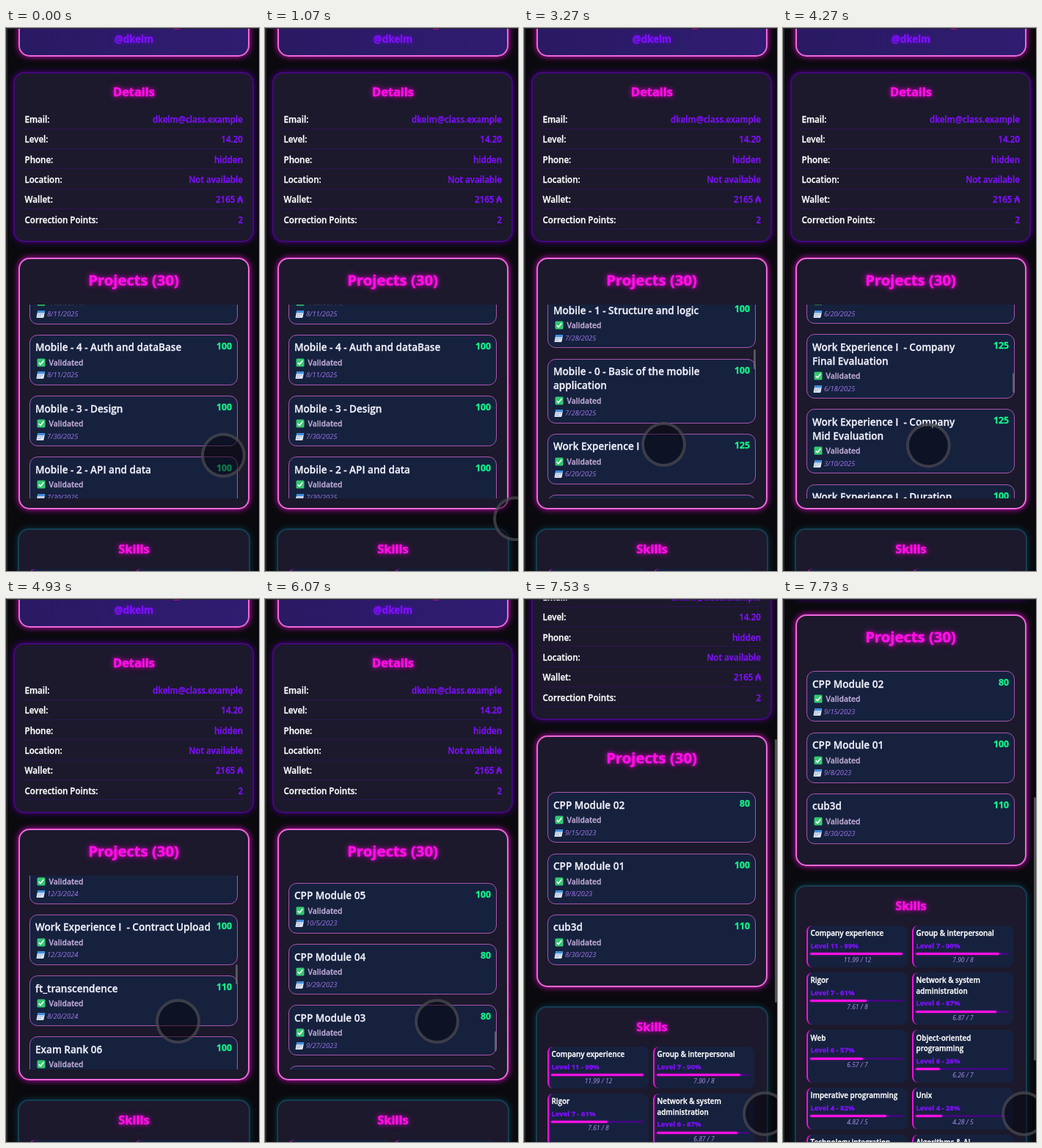
Write an HTML page that moves like this. It is 345 px wide and 740 px high and loops after 8000 ms.

```html
<!DOCTYPE html>
<html lang="en">
<head>
<meta charset="utf-8">
<title>Profile scroll</title>
<style>
  html, body { margin: 0; width: 100%; height: 100%; overflow: hidden; background: #0a0a0e; }
  body { font-family: "Open Sans", "Noto Sans", sans-serif; }
  div, p, svg { position: absolute; box-sizing: border-box; margin: 0; }
  #stage { left: 0; top: 0; width: 345px; height: 740px; overflow: hidden; background: #0a0a0e; }
  #page { left: 0; top: 0; width: 345px; height: 1300px; }
  p { white-space: pre; line-height: 20px; -webkit-text-stroke: .3px currentColor; }
  p.right { text-align: right; width: 200px; }
  p.center { text-align: center; width: 300px; }

  .panel { border-radius: 15px; background: #1c192c; }
  .header { background: linear-gradient(90deg, #291a63, #301c70); }
  .header, .projects { border: 2px solid #ec68d6; box-shadow: 0 0 9px #f010dce0; }
  .details { border: 2px solid #43087a; box-shadow: 0 0 9px #4b0082; }
  .skills { border: 2px solid #143e52; box-shadow: 0 0 8px #0a4f66a0; }

  .handle { font-size: 13.3px; font-weight: 700; color: #8010ff; text-shadow: 0 0 6px #7f00ffb0; }
  .heading { font-size: 16.4px; font-weight: 700; color: #ff10e6; -webkit-text-stroke-width: .5px;
             text-shadow: 0 0 5px #ff00e0b0, 0 0 10px #ff00e0a0; }
  .big { font-size: 20.3px; }
  .label, .value { font-size: 11.6px; font-weight: 600; color: #fff; }
  .value { color: #8010ff; }
  .rule { height: 1px; background: #2b1450; }

  #list { left: 32px; top: 377px; width: 285px; height: 264px; overflow: hidden; }
  #cards { left: 0; top: 0; width: 285px; }
  .card { left: 0; width: 284px; border: 1px solid #a655ab; border-radius: 11px; background: #16213e; }
  .title { font-size: 13.55px; font-weight: 600; color: #f1f1fb; line-height: 19px; }
  .score { font-size: 12.3px; font-weight: 700; color: #14f58a; }
  .status { font-size: 10.35px; font-weight: 600; color: #bfabd6; }
  .date { font-size: 9.3px; font-style: italic; color: #9370db; -webkit-text-stroke-width: .1px; }

  .skill { width: 138px; border-left: 2px solid #f010e0; border-radius: 8px; background: #16213e; }
  .name { font-size: 9.85px; font-weight: 600; color: #fff; line-height: 14.5px; }
  .level { font-size: 9.5px; font-weight: 700; color: #8010ff; }
  .ratio { font-size: 8.5px; font-style: italic; color: #9d86dc; -webkit-text-stroke-width: .1px; }
  .track { width: 127px; height: 3px; border-radius: 2px; background: #40087a; }
  .fill { height: 3px; border-radius: 2px; background: #ff10e6; box-shadow: 0 0 3px #ff00e080; }

  .thumb { width: 3px; border-radius: 2px; background: #7a7a80a0; }
  #pageThumb { left: 342px; height: 359px; }
  #listThumb { left: 281px; }
  #touch { left: -30.5px; top: -30.5px; width: 61px; height: 61px; border-radius: 50%;
           border: 4px solid #5c5c6498; background: #05050a80; filter: blur(.6px); }
  .edge { left: 0; top: 0; background: #2b2b2e; }
</style>
</head>
<body>
<div id="stage">
  <div id="page"></div>
  <div id="pageThumb" class="thumb"></div>
  <div id="touch"></div>
  <div class="edge" style="width:2px;height:740px"></div>
  <div class="edge" style="width:345px;height:1px"></div>
</div>
<script>
const LOOP = 8000;
const PITCH = 83.2, CARD_HEIGHT = 69, LINE = 19;
const VIEW = 264, THUMB = 27;
const START_SCROLL = 292, MAX_SCROLL = 2290;
const HIDDEN_ABOVE = 3;   // projects that never come into view

const $ = id => document.getElementById(id);

// y is the middle of the first text line
function text(x, y, cls, str, align = "", lineHeight = 20) {
  const left = align === "right" ? x - 200 : align === "center" ? x - 150 : x;
  return `<p class="${cls} ${align}" style="left:${left}px;top:${y - lineHeight / 2}px">${str}</p>`;
}
const box = (cls, x, y, w, h, inner = "") =>
  `<div class="${cls}" style="left:${x}px;top:${y}px;width:${w}px;height:${h}px">${inner}</div>`;
const icon = (x, y, inner) =>
  `<svg style="left:${x}px;top:${y}px" width="13" height="12" viewBox="0 0 13 12">${inner}</svg>`;

const CHECK = `<rect x=".5" y=".5" width="11" height="11" rx="1.5" fill="#35c873"/>
  <path d="M2.7 6.2 5 8.6 9.4 3.2" fill="none" stroke="#fff" stroke-width="1.6"/>`;
const CALENDAR = `<g transform="translate(2 0) skewX(-11)">
  <rect x=".5" y="1" width="10" height="10" rx="1" fill="#dfe6f4"/>
  <rect x=".5" y="1" width="10" height="3.2" rx="1" fill="#3f8fdc"/>
  <path d="M2 6.2h7M2 8.6h5" stroke="#8ba0c8" stroke-width="1.2" stroke-dasharray="1.5 1"/></g>`;

const details = [
  ["Email:", "dkelm@class.example"], ["Level:", "14.20"], ["Phone:", "hidden"],
  ["Location:", "Not available"], ["Wallet:", "2165 ₳"], ["Correction Points:", "2"]
];

const projects = [
  ["Mobile - 5 - Manage data", "8/11/2025", 100],
  ["Mobile - 4 - Auth and dataBase", "8/11/2025", 100],
  ["Mobile - 3 - Design", "7/30/2025", 100],
  ["Mobile - 2 - API and data", "7/30/2025", 100],
  ["Mobile - 1 - Structure and logic", "7/28/2025", 100],
  ["Mobile - 0 - Basic of the mobile\napplication", "7/28/2025", 100],
  ["Work Experience I", "6/20/2025", 125],
  ["Work Experience I  - Peer Video", "6/20/2025", 100],
  ["Work Experience I  - Company\nFinal Evaluation", "6/18/2025", 125],
  ["Work Experience I  - Company\nMid Evaluation", "3/10/2025", 125],
  ["Work Experience I  - Duration", "12/3/2024", 100],
  ["Work Experience I  - Contract Upload", "12/3/2024", 100],
  ["ft_transcendence", "8/20/2024", 110],
  ["Exam Rank 06", "7/18/2024", 100],
  ["webserv", "6/12/2024", 100],
  ["Inception", "3/20/2024", 100],
  ["CPP Module 09", "2/14/2024", 100],
  ["CPP Module 08", "1/24/2024", 100],
  ["CPP Module 07", "11/8/2023", 100],
  ["CPP Module 06", "10/20/2023", 100],
  ["Exam Rank 05", "10/12/2023", 100],
  ["CPP Module 05", "10/5/2023", 100],
  ["CPP Module 04", "9/29/2023", 80],
  ["CPP Module 03", "9/27/2023", 80],
  ["CPP Module 02", "9/15/2023", 80],
  ["CPP Module 01", "9/8/2023", 100],
  ["cub3d", "8/30/2023", 110]
];

const skillRows = [
  [["Company experience", 11, 99, "11.99 / 12"], ["Group &amp; interpersonal", 7, 90, "7.90 / 8"]],
  [["Rigor", 7, 61, "7.61 / 8"], ["Network &amp; system\nadministration", 6, 87, "6.87 / 7"]],
  [["Web", 6, 57, "6.57 / 7"], ["Object-oriented\nprogramming", 6, 26, "6.26 / 7"]],
  [["Imperative programming", 4, 82, "4.82 / 5"], ["Unix", 4, 28, "4.28 / 5"]],
  [["Technology integration", 4, 20, "4.20 / 5"], ["Algorithms &amp; AI", 4, 10, "4.10 / 5"]]
];

function buildCards() {
  let y = HIDDEN_ABOVE * PITCH;
  return projects.map(([title, date, score]) => {
    const extra = title.includes("\n") ? LINE : 0;
    const html = box("card", 0, y, 284, CARD_HEIGHT + extra)
      + text(8, y + 18, "title", title, "", 19)
      + text(276, y + 16, "score", score, "right")
      + icon(9.5, y + 32 + extra, CHECK)
      + text(26.5, y + 38 + extra, "status", "Validated")
      + icon(9, y + 49.5 + extra, CALENDAR)
      + text(24, y + 55.5 + extra, "date", date);
    y += PITCH + extra;
    return html;
  }).join("");
}

function skillCard([name, level, percent, ratio], x, y, height) {
  const extra = name.includes("\n") ? 14.5 : 0;
  return box("skill", x, y, 138, height)
    + text(x + 6, y + 11, "name", name, "", 14.5)
    + text(x + 6, y + 28 + extra, "level", `Level ${level} - ${percent}%`)
    + box("track", x + 5.5, y + 37.5 + extra, 127, 3, box("fill", 0, 0, 1.27 * percent, 3))
    + text(x + 70, y + 47.5 + extra, "ratio", ratio, "center");
}

function buildSkills() {
  let y = 736.5;
  return skillRows.map(row => {
    const height = row.some(s => s[0].includes("\n")) ? 71.5 : 57;
    const html = row.map((s, i) => skillCard(s, 31.5 + i * 144, y, height)).join("");
    y += height + 7;
    return html;
  }).join("");
}

$("page").innerHTML =
  box("panel header", 17, -80, 315, 119)
  + box("", 229, 0, 8, 2, `<div style="inset:0;background:#b01080"></div>`)
  + text(174.5, 15, "handle", "@dkelm", "center")
  + box("panel details", 10, 60, 328, 232)
  + text(174.5, 86.5, "heading", "Details", "center")
  + details.map(([label, value], i) => {
      const y = 125 + i * 27.35;
      return text(25.5, y, "label", label) + text(323, y, "value", value, "right")
        + box("rule", 25, Math.round(y + 11.5), 298, 1);
    }).join("")
  + box("panel projects", 17, 313, 315, 343)
  + text(174, 342.5, "heading big", "Projects (30)", "center")
  + `<div id="list"><div id="cards">${buildCards()}</div><div id="listThumb" class="thumb"></div></div>`
  + box("panel skills", 16, 682, 317, 500)
  + text(174.5, 710, "heading", "Skills", "center")
  + buildSkills();
$("listThumb").style.height = THUMB + "px";

// Keys: [time, ...values]
const listKeys = [
  [1665, 0], [1870, 60], [2130, 60], [2730, 215], [3000, 215], [3270, 300], [3400, 330],
  [3670, 330], [4070, 540], [4200, 540], [4930, 877], [5130, 877], [5470, 1270],
  [5730, 1270], [6070, 1752], [6200, 1752], [6600, 1985], [6730, 1998]
];
const pageKeys = [[7465, 0], [7730, 291.5]];
const touchKeys = [
  [0, 296, 582], [470, 254.5, 513], [805, 254.5, 513], [1070, 341, 668], [1140, 344, 693],
  [1600, 177, 562], [2130, 177, 562], [2400, 190, 567], [4200, 190, 567], [4600, 234, 575],
  [6865, 234, 575], [7330, 328, 701]
];

const linear = u => u;
const easeOut = u => 1 - (1 - u) ** 2;

function track(keys, t, ease) {
  const next = keys.findIndex(k => k[0] > t);
  if (next === 0) return keys[0].slice(1);
  if (next < 0) return keys.at(-1).slice(1);
  const a = keys[next - 1], b = keys[next];
  const u = ease((t - a[0]) / (b[0] - a[0]));
  return a.slice(1).map((v, i) => v + (b[i + 1] - v) * u);
}

function draw(now) {
  const t = now % LOOP;
  const scroll = START_SCROLL + track(listKeys, t, easeOut)[0];
  const pageScroll = track(pageKeys, t, easeOut)[0];
  const [x, y] = track(touchKeys, t, linear);

  $("cards").style.transform = `translateY(${-Math.round(scroll)}px)`;
  $("listThumb").style.top = scroll / MAX_SCROLL * (VIEW - THUMB) + "px";
  $("listThumb").style.opacity = t < 1700 ? 0 : Math.max(0, Math.min(1, (7200 - t) / 200));
  $("page").style.transform = `translateY(${-Math.round(pageScroll)}px)`;
  $("pageThumb").style.top = 129 + pageScroll * 0.485 + "px";
  $("pageThumb").style.opacity = pageScroll > 0 ? 1 : 0;
  $("touch").style.transform = `translate(${x}px, ${y}px)`;
  requestAnimationFrame(() => draw(performance.now() - start));
}
const start = performance.now();
draw(0);
</script>
</body>
</html>
```
